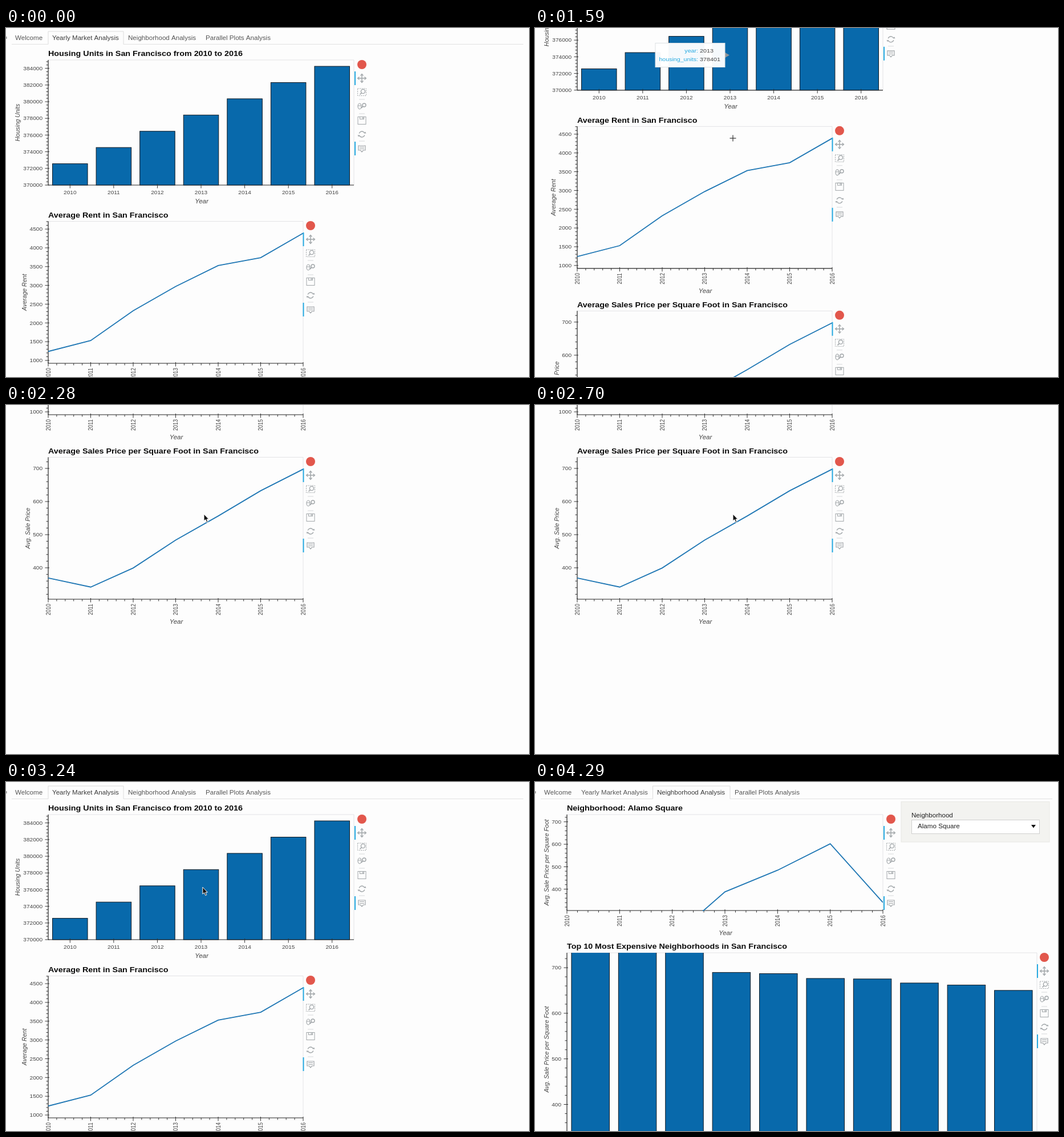
Write an HTML page with a canvas that moves like this. It is 917 by 611 pixels and loops after 4320 ms.

```html
<!DOCTYPE html>
<html lang="en">
<head>
<meta charset="utf-8">
<title>Housing dashboard</title>
<style>
html, body { margin: 0; width: 100%; height: 100%; overflow: hidden; background: #fdfdfd; }
canvas { display: block; }
</style>
</head>
<body>
<canvas id="stage" width="917" height="611"></canvas>
<script>
const c = document.getElementById('stage').getContext('2d');
const LOOP = 4320, STEP = 30, CLICK = 3810;
const ASPECT = 1.12; // the whole page is a little wider than tall
const FONT = '"Liberation Sans", Arial, sans-serif';
const BLUE = '#0869ab', LINE = '#1f77b4', ACCENT = '#26aae1', ICON = '#a1a6a9';
const YEARS = [2010, 2011, 2012, 2013, 2014, 2015, 2016];
const UNITS = YEARS.map((y, i) => 372560 + 1947 * i);

const ease = (t, a, b) => {
  const u = Math.min(1, Math.max(0, (t - a) / (b - a)));
  return u * u * (3 - 2 * u);
};

function text(s, x, y, { size = 9, style = '', color = '#444', align = 'center', up = false } = {}) {
  c.save();
  c.translate(x, y);
  c.scale(ASPECT, 1);
  if (up) c.rotate(-Math.PI / 2);
  c.font = `${style} ${size}px ${FONT}`;
  c.fillStyle = color;
  c.textAlign = align;
  c.fillText(s, 0, size * 0.36);
  c.restore();
}

function rect(x, y, w, h, fill, stroke) {
  if (fill) { c.fillStyle = fill; c.fillRect(x, y, w, h); }
  if (stroke) { c.strokeStyle = stroke; c.strokeRect(x, y, w, h); }
}

function path(points, color, width = 1, close = false, fill) {
  c.beginPath();
  points.forEach(p => c.lineTo(p[0], p[1]));
  if (close) c.closePath();
  if (fill) { c.fillStyle = fill; c.fill(); }
  if (color) { c.strokeStyle = color; c.lineWidth = width; c.stroke(); }
  c.lineWidth = 1;
}

function circle(x, y, r, fill, from = 0, to = 2 * Math.PI) {
  c.beginPath();
  c.arc(x, y, r, from, to);
  if (fill) { c.fillStyle = fill; c.fill(); } else c.stroke();
}

function lens(x, y, r) {
  circle(x, y, r);
  path([[x - r * 0.7, y + r * 0.7], [x - r * 0.7 - 3, y + r * 0.7 + 3]], ICON, 1.6);
}

// Tool column; y is the centre of the first icon
function tools(x, y, edge) {
  rect(edge - 1, y + 12, 2, 24, ACCENT);
  rect(edge - 1, y + 135, 2, 24, ACCENT);
  circle(x, y, 8, '#e2574c');
  for (const d of [61, 86, 134]) rect(x - 5, y + d - 0.5, 10, 1, '#d8dadc');
  c.save();
  c.translate(x, y + 24);
  path([[-7, 0], [7, 0]], ICON, 1.5);
  path([[0, -7], [0, 7]], ICON, 1.5);
  for (let i = 0; i < 4; i++) {
    path([[4.5, -2.5], [7.5, 0], [4.5, 2.5]], ICON, 1.2);
    c.rotate(Math.PI / 2);
  }
  c.translate(0, 24);
  c.setLineDash([2, 1.5]);
  rect(-7.5, -6, 15, 12.5, null, ICON);
  c.setLineDash([]);
  c.lineWidth = 1.4;
  lens(2, -1, 3.6);
  c.translate(0, 25);
  c.strokeStyle = ICON;
  c.lineWidth = 1.2;
  c.beginPath();
  c.ellipse(-4, 0, 3, 5, 0, 0, 7);
  c.stroke();
  path([[-7, -1], [-1, -1]], ICON);
  c.lineWidth = 1.4;
  lens(4, -2, 3);
  c.translate(0, 25);
  rect(-7, -6.5, 14, 13, null, ICON);
  rect(-3.5, -6.5, 7, 4, null, ICON);
  rect(0.5, -5.5, 2, 2, ICON);
  c.translate(0, 24);
  c.lineWidth = 1.4;
  c.strokeStyle = ICON;
  circle(0, 0, 5, null, 0.3, 2.7);
  circle(0, 0, 5, null, 3.45, 5.85);
  path([[3.5, -1.5], [7.5, -1.5], [6, -4.5]], null, 1, true, ICON);
  path([[-3.5, 1.5], [-7.5, 1.5], [-6, 4.5]], null, 1, true, ICON);
  c.translate(0, 25);
  path([[-6, -5], [6, -5], [6, 3], [2.5, 3], [0, 6], [-2.5, 3], [-6, 3]], ICON, 1.2, true);
  for (const d of [-2.5, 0.5]) path([[-4, d], [4, d]], ICON);
  c.restore();
}

// p: left, right, top, bottom, title, label, labelX, base [value, y], k px per unit, major, minor
function frame(p) {
  const { l, r, t, b } = p;
  const toY = v => p.base[1] - (v - p.base[0]) * p.k;
  const toV = y => p.base[0] + (p.base[1] - y) / p.k;
  text(p.title, l, t - 11.3, { size: 12.8, style: 'bold', color: '#0c0c0c', align: 'left' });
  path([[l, t], [r, t], [r, b]], '#e3e3e6');
  path([[l, t], [l, b]], '#222', 1.2);
  path([[l, b], [r, b]], '#222', 1.2);
  for (let v = Math.ceil(toV(b) / p.minor - 0.01) * p.minor; v <= toV(t); v += p.minor) {
    const y = toY(v), big = v % p.major === 0;
    path([[l - (big ? 5.5 : 3.5), y], [l + (big ? 2 : 0), y]], '#333');
    if (big) text(v, l - 10, y, { align: 'right' });
  }
  text(p.label, p.labelX, p.labelY || (t + b) / 2, { size: 10.55, style: 'italic', up: true });
  return toY;
}

function clipTo(p, draw) {
  c.save();
  c.beginPath();
  c.rect(p.l, p.t, p.r - p.l, p.b - p.t + 1);
  c.clip();
  draw();
  c.restore();
}

function bars(p, values, width) {
  const toY = frame(p), step = (p.r - p.l) / values.length;
  clipTo(p, () => values.forEach((v, i) =>
    rect(p.l + step * (i + 0.5) - width / 2, toY(v), width, p.b - toY(v), BLUE, '#101820')));
}

function yearLine(p, values) {
  const toY = frame(p), step = (p.r - p.l) / 6;
  for (let i = 0; i <= 30; i++) {
    const x = p.l + step * i / 5, big = i % 5 === 0;
    path([[x, p.b - (big ? 2 : 0)], [x, p.b + (big ? 5.5 : 3.5)]], '#333');
    if (big) text(YEARS[i / 5], x, p.b + 18, { up: true });
  }
  text('Year', (p.l + p.r) / 2 + 1, p.b + 39, { size: 10.3, style: 'italic' });
  clipTo(p, () => path(values.map((v, i) => [p.l + step * i, toY(v)]), LINE, 1.8));
}

const UNIT_PLOT = { l: 74, r: 610, t: 56, b: 275, title: 'Housing Units in San Francisco from 2010 to 2016',
  label: 'Housing Units', labelX: 20, base: [370000, 275], k: 0.0146, major: 2000, minor: 400 };
const RENT_PLOT = { l: 74, r: 521, t: 338.5, b: 587, title: 'Average Rent in San Francisco',
  label: 'Average Rent', labelX: 32, base: [1000, 582], k: 0.0657, major: 500, minor: 100 };
const PRICE_PLOT = { l: 74, r: 521, t: 661.5, b: 910, title: 'Average Sales Price per Square Foot in San Francisco',
  label: 'Avg. Sale Price', labelX: 38, base: [400, 855], k: 0.58, major: 100, minor: 20 };
const AREA_PLOT = { l: 56, r: 610, t: 56, b: 224, title: 'Neighborhood: Alamo Square',
  label: 'Avg. Sale Price per Square Foot', labelX: 20, base: [400, 186.6], k: 0.393, major: 100, minor: 20 };
const TOP_PLOT = { l: 56, r: 880, t: 298, b: 700, title: 'Top 10 Most Expensive Neighborhoods in San Francisco',
  label: 'Avg. Sale Price per Square Foot', labelX: 20, labelY: 467, base: [400, 563.5], k: 0.798, major: 100, minor: 20 };

const TABS = [['Welcome', 16, 8, 74], ['Yearly Market Analysis', 81, 74, 206],
  ['Neighborhood Analysis', 214, 206.5, 342], ['Parallel Plots Analysis', 350, 342, 472]];

function tabBar(active, hovered) {
  path([[10, 28.5], [907, 28.5]], '#e2e2e2');
  rect(0, 15, 1.5, 4, '#999');
  TABS.forEach(([name, x, l, r], i) => {
    if (i === active) {
      rect(l, 6, r - l, 24, '#fdfdfd');
      path([[l, 28.5], [l, 6], [r, 6], [r, 28.5]], '#dcdcdc');
    } else if (i === hovered) rect(l, 6, r - l, 23, '#e8e8e6');
    text(name, x, 17.3, { size: 10.35, align: 'left', color: i === active ? '#3a3a3a' : '#555' });
  });
}

function yearlyPage() {
  bars(UNIT_PLOT, UNITS, 61.5);
  YEARS.forEach((y, i) => {
    const x = 74 + 536 / 7 * (i + 0.5);
    path([[x, 273], [x, 280.5]], '#333');
    text(y, x, 287.7);
  });
  text('Year', 343, 303, { size: 10.3, style: 'italic' });
  tools(624, 64, 612);
  yearLine(RENT_PLOT, [1239, 1530, 2324, 2971, 3528, 3739, 4390]);
  tools(534, 346, 521.5);
  yearLine(PRICE_PLOT, [369.3, 341.9, 399.4, 483.6, 556.3, 632.5, 697.6]);
  tools(534, 669, 521.5);
}

function areaPage() {
  yearLine(AREA_PLOT, [291, 272, 183, 388, 484.4, 602, 341]);
  tools(624, 64, 612);
  bars(TOP_PLOT, [904, 788, 780, 689.6, 687, 676.4, 675.3, 666.4, 662, 650.2], 66.5);
  tools(893, 306, 881);
  rect(642, 33.5, 260, 70.5, '#f3f3f0', '#e8e8e4');
  text('Neighborhood', 660, 57, { size: 10.35, color: '#222', align: 'left' });
  rect(660.5, 65.5, 224, 24, '#fff', '#cfcfcf');
  text('Alamo Square', 671, 76.5, { size: 10.4, color: '#222', align: 'left' });
  path([[870, 74], [878, 74], [874, 79.5]], null, 1, true, '#111');
}

function tooltip(i) {
  const x = 74 + 536 / 7 * (i + 0.5), y = 275 - (UNITS[i] - 370000) * 0.0073;
  const side = i < 3 ? 1 : -1, left = side > 0 ? x + 10 : x - 131;
  path([[x + side, y], [x + side * 9.5, y - 5], [x + side * 9.5, y + 5]], null, 1, true, '#909599');
  rect(left, y - 21, 122, 42, 'rgba(255,255,255,.96)', '#dde1e4');
  [['year:', YEARS[i]], ['housing_units:', UNITS[i]]].forEach(([name, value], row) => {
    const ty = y - 8 + row * 15.5;
    text(name, left + 75, ty, { size: 9.5, color: ACCENT, align: 'right' });
    text(value, left + 78, ty, { size: 9.6, align: 'left' });
  });
}

function cursor(kind, x, y) {
  c.save();
  c.translate(x, y);
  if (kind === 'cross') {
    path([[-5.5, 0], [5.5, 0]], '#333', 1.2);
    path([[0, -5.5], [0, 5.5]], '#333', 1.2);
  } else if (kind === 'arrow') {
    path([[0, -2], [0, 10], [2.8, 7.6], [5, 12.5], [7, 11.5], [5, 7], [8.6, 7]], '#fff', 1, true, '#111');
  } else {
    path([[-1, -1], [1, -1], [1.5, 4], [7, 5], [8, 7], [6.5, 12], [0, 12], [-4, 7], [-3, 5.5], [-1, 7]], '#333', 1.1, true, '#fff');
    for (const d of [2.3, 4.5]) path([[d, 4.5], [d, 8]], '#333', 0.8);
  }
  c.restore();
}

// Rest points of the pointer: start, end, x, y
const MOVES = [[300, 850, 217, 235], [870, 1250, 347, 193], [3200, 3540, 289, 13], [3860, 4050, 289, -30]];

function pointer(t) {
  let x = -20, y = 265;
  for (const [from, to, mx, my] of MOVES) {
    const u = ease(t, from, to);
    x += (mx - x) * u;
    y += (my - y) * u;
  }
  return [x, y];
}

function draw(t) {
  const scroll = 570 * ease(t, 1290, 2130) - 571 * ease(t, 2700, 3196);
  const [x, y] = pointer(t);
  const inspecting = t < 1800 && x > 74;
  const onTab = t > 3200 && y > 0 && y < 29;
  const yearly = t < CLICK;
  rect(0, 0, 917, 611, '#fdfdfd');
  c.save();
  c.translate(0, -scroll);
  tabBar(yearly ? 1 : 2, onTab ? 2 : -1);
  if (yearly) yearlyPage(); else areaPage();
  if (inspecting) {
    const step = 536 / 7, i = Math.floor((x - 74) / step);
    const inside = Math.abs(x - 74 - step * (i + 0.5)) < 31;
    if (inside && y > 275 - (UNITS[i] - 370000) * 0.0146) tooltip(i);
  }
  c.restore();
  cursor(inspecting ? 'cross' : onTab ? 'hand' : 'arrow', x, y);
}

const start = performance.now();
function tick() {
  const t = (performance.now() - start) % LOOP;
  draw(Math.floor(t / STEP) * STEP);
  requestAnimationFrame(tick);
}
tick();
</script>
</body>
</html>
```
